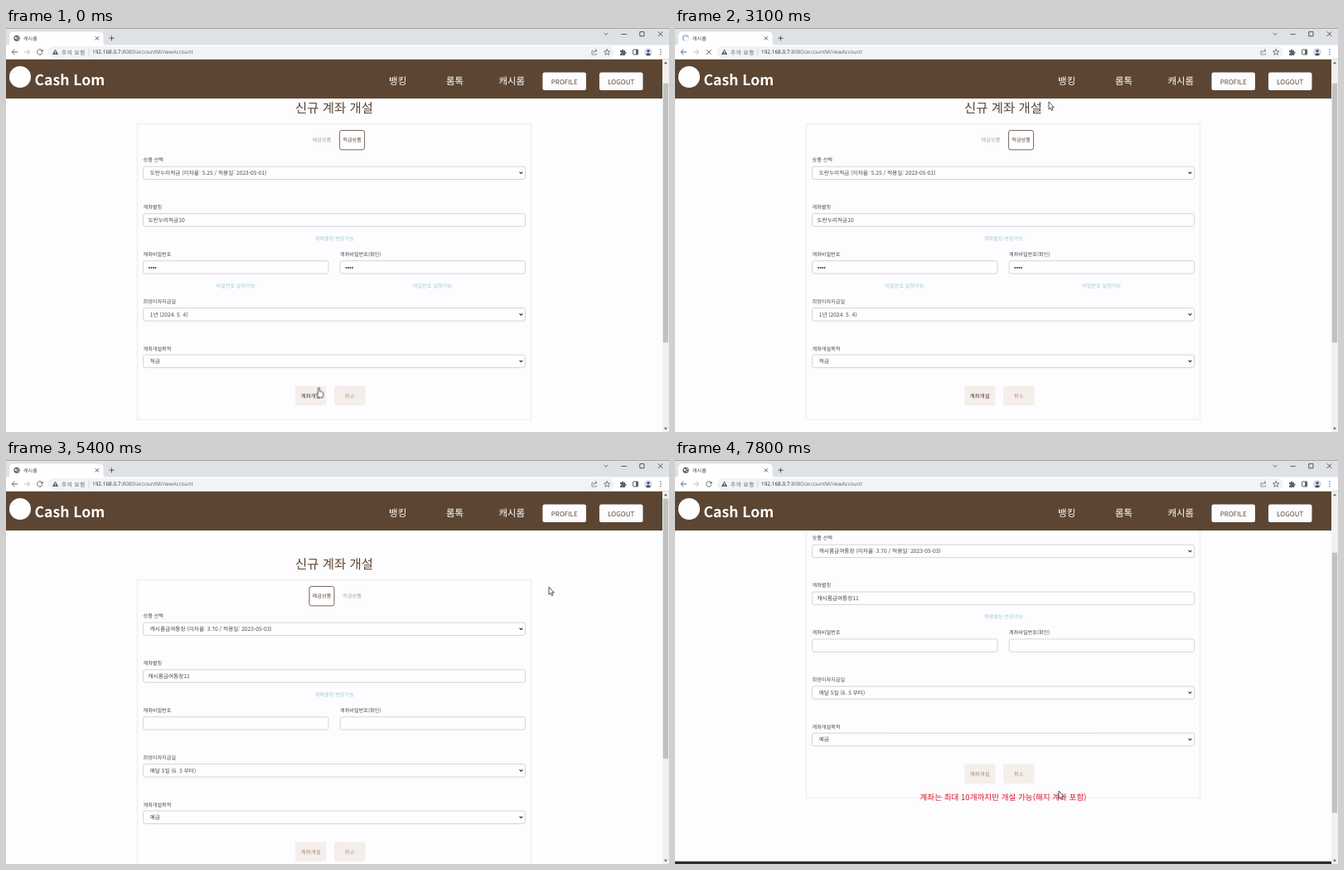
An HTML page that plays this animation: 800x487 px, repeating every 8 s.

```html
<!DOCTYPE html>
<html lang="ko">
<head>
<meta charset="utf-8">
<title>캐시롬</title>
<style>
html, body { margin: 0; width: 100%; height: 100%; overflow: hidden; background: #fdfcfe; }
svg { display: block; width: 100vw; height: 100vh; }
text { font-family: 'Noto Sans CJK KR', 'Noto Sans KR', 'Noto Sans CJK', sans-serif; text-rendering: geometricPrecision; white-space: pre; }
text.ui { font-family: 'Open Sans', 'Noto Sans CJK KR', 'Noto Sans CJK', sans-serif; }

/* page states, 1% = 80ms */
.first, .blank, .list, .last, .site, .idle, .busy, .ask, .done, .hover, .hand, .arrow { animation: 8s step-end infinite; }
.first { animation-name: first; }
.blank { animation-name: blank; }
.list { animation-name: list; }
.last { animation-name: last; }
.site { animation-name: site; }
.idle { animation-name: idle; }
.busy { animation-name: busy; }
.ask { animation-name: ask; }
.done { animation-name: done; }
.hover { animation-name: hover; }
.hand { animation-name: hand; }
.arrow { animation-name: arrow; }
@keyframes first { 0% { visibility: visible } 40%, 100% { visibility: hidden } }
@keyframes blank { 0% { visibility: hidden } 40% { visibility: visible } 52%, 100% { visibility: hidden } }
@keyframes list { 0% { visibility: hidden } 52% { visibility: visible } 65%, 100% { visibility: hidden } }
@keyframes last { 0% { visibility: hidden } 65%, 100% { visibility: visible } }
@keyframes site { 0% { visibility: visible } 40% { visibility: hidden } 52%, 100% { visibility: visible } }
@keyframes idle { 0% { visibility: visible } 37.5% { visibility: hidden } 52.5% { visibility: visible } 63.75% { visibility: hidden } 66.25%, 100% { visibility: visible } }
@keyframes busy { 0% { visibility: hidden } 37.5% { visibility: visible } 52.5% { visibility: hidden } 63.75% { visibility: visible } 66.25%, 100% { visibility: hidden } }
@keyframes ask { 0% { visibility: hidden } 2% { visibility: visible } 37.5%, 100% { visibility: hidden } }
@keyframes done { 0% { visibility: hidden } 41% { visibility: visible } 50.4%, 100% { visibility: hidden } }
@keyframes hover { 0% { visibility: hidden } 22.5% { visibility: visible } 34.5%, 100% { visibility: hidden } }
@keyframes hand { 0% { visibility: visible } 8% { visibility: hidden } 58% { visibility: visible } 65%, 100% { visibility: hidden } }
@keyframes arrow { 0% { visibility: hidden } 8% { visibility: visible } 58% { visibility: hidden } 65%, 100% { visibility: visible } }

#scroll { animation: scroll 8s ease-in-out infinite; }
#thumb { animation: thumb 8s ease-in-out infinite; }
@keyframes scroll {
  0%, 68.1% { transform: translateY(29px) }
  73.1%, 76.25% { transform: translateY(-59.7px) }
  78.75%, 100% { transform: translateY(-64.8px) }
}
@keyframes thumb {
  0%, 68.1% { transform: translateY(0) }
  73.1%, 76.25% { transform: translateY(60.5px) }
  78.75%, 100% { transform: translateY(65px) }
}
#spin { transform-origin: 13px 12.3px; animation: spin 1s linear infinite; }
@keyframes spin { to { transform: rotate(360deg) } }

#cursor { animation: move 8s ease-in-out infinite; }
@keyframes move {
  0%, 1.875% { transform: translate(377.5px, 433.5px) }
  6.25% { transform: translate(430.5px, 150.5px) }
  11.25% { transform: translate(446px, 96px) }
  15.6% { transform: translate(350px, 70px) }
  19.4% { transform: translate(478px, 70px) }
  23.75% { transform: translate(466px, 92px) }
  25% { transform: translate(465.5px, 91px) }
  33.75% { transform: translate(470px, 88px) }
  35%, 38% { transform: translate(450px, 89px) }
  43.75%, 50% { transform: translate(476.5px, 86.5px) }
  57.5% { transform: translate(689px, 154px) }
  58.75%, 65% { transform: translate(700px, 152px) }
  73.75%, 75% { transform: translate(437.5px, 158px) }
  85% { transform: translate(300px, 415px) }
  88.75% { transform: translate(480px, 415px) }
  91.25% { transform: translate(425px, 362px) }
  93.1% { transform: translate(265px, 405px) }
  96.25% { transform: translate(458px, 400px) }
  97.5%, 100% { transform: translate(463px, 399px) }
}
</style>
</head>
<body>
<svg id="stage" viewBox="0 0 800 487" preserveAspectRatio="none"></svg>
<script>
const BROWN = '#5c4633', TAN = '#a58d78', PALE = '#f5efec', DARK = '#3a3536', GREY = '#5f6368', BLUE = '#1a73e8';
const HOST = '192.168.0.7', DIR = ':8080/accountM/';

// y is the optical middle of the line
const text = (x, y, s, size, fill, weight = 400, anchor = 'middle', cls = '') =>
  `<text class="${cls}" x="${x}" y="${(y + size * .37).toFixed(2)}" font-size="${size}" fill="${fill}" font-weight="${weight}" text-anchor="${anchor}">${s}</text>`;
const left = (x, y, s, size, fill, weight, cls) => text(x, y, s, size, fill, weight, 'start', cls);
const rect = (x, y, w, h, fill, r = 0, stroke = 'none', sw = .8) =>
  `<rect x="${x}" y="${y}" width="${w}" height="${h}" rx="${r}" fill="${fill}" stroke="${stroke}" stroke-width="${sw}"/>`;
const line = (d, stroke, sw = 1) => `<path d="${d}" fill="none" stroke="${stroke}" stroke-width="${sw}"/>`;
const fill = (d, color) => `<path d="${d}" fill="${color}"/>`;
const circle = (x, y, r, color, stroke = 'none', sw = .8) =>
  `<circle cx="${x}" cy="${y}" r="${r}" fill="${color}" stroke="${stroke}" stroke-width="${sw}"/>`;
const group = (cls, ...parts) => `<g class="${cls}">${parts.join('')}</g>`;

function chrome() {
  const url = (cls, path) => group(cls,
    `<text class="ui" x="104" y="31.3" font-size="6.43" fill="#26282b">${HOST}<tspan fill="${GREY}">${DIR}${path}</tspan></text>`);
  return [
    rect(0, 0, 800, 21, '#dee1e6'), rect(0, 0, 800, 1, '#a2a5a9'),
    fill('M1 21Q4 21 4 18V9Q4 4.5 8.5 4.5H113Q117.5 4.5 117.5 9V18Q117.5 21 121 21Z', '#fff'),
    rect(0, 20.5, 800, 17, '#fff'), rect(0, 37, 800, 1, '#dddfe3'),
    group('idle', circle(13, 12.3, 3.6, GREY),
      fill('M10.3 11.2Q12 10.2 13 11.5T11.8 13.6ZM13.8 9.6L15.6 11 14.6 12.2ZM13.5 13.2L15.2 13.4 13.8 15Z', '#fff'),
      line('M43.4 27A3.2 3.2 0 1 0 44 29.8', GREY), fill('M44.6 25.4V28.6H41.4Z', GREY)),
    group('busy', '<g id="spin">' + circle(13, 12.3, 3.4, 'none', '#e4e6ea', 1) + line('M13 15.7A3.4 3.4 0 1 1 14.7 9.4', BLUE, 1) + '</g>',
      line('M38 26.3L43.6 31.9M43.6 26.3L38 31.9', GREY)),
    group('site', left(21, 12.3, '캐시롬', 6.1, '#4a4d51', 400, 'ui')),
    group('blank', left(21, 12.3, HOST + DIR + 'accou', 5.55, '#4a4d51', 400, 'ui'),
      rect(95, 6, 9, 13, 'url(#fade)'), rect(102, 6, 5, 13, '#fff')),
    line('M107.8 10.3L112 14.5M112 10.3L107.8 14.5', '#46494d', .9),
    line('M124.5 12.3H130.5M127.5 9.3V15.3', '#46494d', .9),
    line('M721.6 6L724 8.4 726.4 6', '#46494d', .8),
    line('M742.7 7.5H748.7M764.8 4.6H770V9.8H764.8ZM786.8 4.4L792.4 10M792.4 4.4L786.8 10', '#333', .8),
    line('M14 29H7.3M10.4 25.9L7.2 29 10.4 32.1', GREY),
    line('M22 29H28.7M25.6 25.9L28.8 29 25.6 32.1', '#babcbe'),
    rect(50.5, 22, 683.5, 14, '#f1f3f4', 7),
    fill('M59.5 25.4L63.2 32H55.8Z', GREY), line('M59.5 27.5V29.8M59.5 30.3V31.2', '#fff', .8),
    `<text class="ui" x="67" y="31.5" font-size="6.7" letter-spacing=".5" fill="${GREY}">주의 요함</text>`,
    rect(99.6, 24.5, .7, 9, '#c3c6c9'),
    url('first', 'newAccount'), url('blank', 'accounts_newAc'), url('list', 'accounts'), url('last', 'newAccount'),
    line('M708.5 27.3H707V32H712.6V30.5M708.8 30Q709 27.4 712.6 27.2M711 25.4L713 27.2 711 29', GREY, .7),
    line('M725.2 25.4L726.2 28 728.9 28.1 726.8 29.8 727.5 32.4 725.2 30.9 722.9 32.4 723.6 29.8 721.5 28.1 724.2 28Z', GREY, .8),
    fill('M741 27H743Q743 25.4 744.1 25.4T745.2 27H747.2V29Q748.7 29 748.7 30T747.2 31V33H741V31Q742.3 31 742.3 30T741 29Z', GREY),
    rect(756.6, 26, 6, 6, 'none', .5, GREY, 1), rect(760, 26, 2.8, 6, GREY),
    circle(775, 29, 4.8, '#d5dcea'), circle(775, 27.6, 1.6, '#3c4a66'), fill('M771.8 32Q775 28.4 778.2 32Q775 34.4 771.8 32Z', '#3c4a66'),
    circle(790, 26.2, .8, GREY), circle(790, 29, .8, GREY), circle(790, 31.8, .8, GREY)
  ].join('');
}

function header() {
  const button = (x, s) => rect(x, 53.5, 52.5, 21.5, '#fdfcfe', 2.5) + text(x + 26.2, 64.6, s, 8, BROWN);
  return group('site',
    rect(0, 38, 792, 47, BROWN), circle(17, 59, 13, '#fff'),
    left(34.5, 62.5, 'Cash Lom', 17.6, '#fff', 700),
    text(472.7, 63.5, '뱅킹', 11.5, '#fff', 500), text(541.5, 63.5, '롬톡', 11.5, '#fff', 500),
    text(610.3, 63.5, '캐시롬', 11.5, '#fff', 500),
    button(647.5, 'PROFILE'), button(716, 'LOGOUT'),
    rect(792, 38, 8, 449, '#f1f1f1'),
    fill('M796 40.6L798 43.2H794ZM796 484.4L798 481.8H794Z', '#606367'),
    group('first', rect(792.8, 66.7, 6.4, 312.5, '#c1c1c1')),
    group('list', rect(792.8, 47, 6.4, 289, '#c1c1c1')),
    group('last', '<g id="thumb">' + rect(792.8, 46.7, 6.4, 313.5, '#c1c1c1') + '</g>'));
}

function form(o) {
  const box = (x, y, w) => rect(x, y, w, 15.4, '#fefdff', 2.2, '#cac9cd');
  const select = (y, s) => box(165.6, y, 461) + left(173.7, y + 7.8, s, 6.67, '#4a4a4e') +
    line(`M619.6 ${y + 6.6}L621.5 ${y + 8.5} 623.4 ${y + 6.6}`, '#333', 1.1);
  const label = (x, y, s) => left(x, y, s, 6.15, '#4a4a4e', 500);
  const hint = (x, y, s) => text(x, y, s, 6.2, '#9fcbd3');
  const dots = x => [0, 1, 2, 3].map(i => circle(x + i * 2.5, 289, .95, '#333')).join('');
  const tab = (x, s, on) => (on ? rect(x - 15, 123.4, 30, 23.4, '#fefdff', 2.5, '#6b5240', .9) : '') +
    text(x, 135.2, s, 6.2, on ? '#5a4a3e' : '#a5a2a2');
  return [
    text(396, 96, '신규 계좌 개설', 15.5, BROWN, 500),
    rect(158.3, 115.4, 475.4, 356.6, 'none', 0, '#e8e6ea'),
    tab(381, '예금상품', !o.ready), tab(417.6, '적금상품', o.ready),
    label(165.5, 158.6, '상품 선택'), select(167, o.product),
    label(165.5, 215.7, '계좌별칭'), box(165.6, 223.8, 461), left(171.5, 231.6, o.nick, 6.67, '#4a4a4e'),
    hint(396.3, 253.6, '계좌별칭 변경가능'),
    label(165.5, 272.5, '계좌비밀번호'), label(403, 272.5, '계좌비밀번호(확인)'),
    box(165.6, 280.7, 223.4), box(403.2, 280.7, 223.4),
    o.ready ? dots(173) + dots(410.5) + hint(277, 310.4, '비밀번호 설정가능') + hint(514.6, 310.4, '비밀번호 설정가능') : '',
    label(165.5, 329.4, '희망이자지급일'), select(337.6, o.due),
    label(165.5, 386.3, '계좌개설목적'), select(394, o.goal),
    rect(349, 431.3, 37.6, 23.6, PALE, 2.5), rect(396, 431.3, 37.8, 23.6, PALE, 2.5),
    text(367.8, 443.2, '계좌개설', 6.5, o.ready ? '#4a3a33' : TAN, o.ready ? 500 : 400),
    text(414.8, 443.2, '취소', 6.5, '#b3947c'),
    o.ready ? '' : text(396, 471.6, '계좌는 최대 10개까지만 개설 가능(해지 계좌 포함)', 9.6, '#d9182f') + rect(0, 548.6, 792, 76, '#2b2a2e')
  ].join('');
}

function accounts() {
  const S = 7.65;
  const heads = (y, cols) => cols.map(([x, s]) => text(x, y, s, S, '#2c292b', 700)).join('');
  const badge = (x, y) => rect(x - 8.6, y - 4.6, 17.2, 9.8, PALE, 2) + text(x, y + .3, '수정', 5.8, TAN);
  const id = (x, y, no, sum) => text(x, y - 4, `888-01-0000${no}-0`, S, DARK) + text(x, y + 5.4, `잔액: ${sum}원`, 5.78, TAN);
  const link = (x, y, s) => text(x, y, s, S, TAN);
  const row = ([no, sum, nick, date, kind], i) => {
    const y = 214.2 + i * 33.25, main = kind === 'main', saving = kind === 'saving';
    return [
      text(38.5, y - 4, main ? '주' : '부', S, main ? '#ef7d55' : DARK), text(38.5, y + 5.4, saving ? '적금' : '예금', 5.8, '#8d8583'),
      id(120.4, y, no, sum), text(235.8, y, nick, S, DARK), badge(296.3, y),
      saving ? '' : circle(351.3, y + .3, 2.8, '#fff', main ? BLUE : '#85858a') + (main ? circle(351.3, y + .3, 1.7, BLUE) : ''),
      text(429.3, y, '사용중', S, DARK),
      main ? text(540.3, y, '주 계좌는 휴면 또는 해지 불가', 5.85, DARK)
        : (saving ? '' : link(503.5, y, '휴면신청')) + link(578, y, '해지신청'),
      link(652.3, y, '변경'), text(727, y, date, S, DARK),
      rect(20, y + 16.4, 744, .9, '#d6c3a6')
    ].join('');
  };
  const rows = [
    ['16', '410,000', '캐시롬_예금통장71', '2023-04-08'],
    ['24', '100,000,092,503', '캐시롬_예금통장6', '2023-04-26'],
    ['26', '100,000,538,898', '캐시롬_예금통장8', '2023-04-26', 'main'],
    ['27', '1,000', '캐시롬_예금통장1', '2023-04-26'],
    ['44', '1,000', '모두다참적금8', '2023-05-02', 'saving']
  ];
  return [
    left(23.3, 143.5, '윤서담 님의 계좌', 16.9, '#4f4743'),
    rect(684, 129.3, 60.6, 26.6, PALE, 3), text(714.5, 143, '새 계좌 개설', 8.2, '#ad9683', 500),
    heads(184.7, [[120.3, '계좌번호'], [247, '계좌별칭'], [351, '주 계좌설정'], [429.3, '계좌상태'], [503.4, '휴면전환'],
      [578, '해지신청'], [652.4, '비밀번호 변경'], [727, '계좌생성일']]),
    `<g clip-path="url(#table)">${rows.map(row).join('')}</g>`,
    rect(764.2, 172, 7.6, 177, '#f1f1f1'), rect(765, 179.3, 6, 88, '#c1c1c1'),
    fill('M768 174.2L769.8 176.6H766.2ZM768 346.8L769.8 344.4H766.2Z', '#606367'),
    heads(410, [[121.3, '계좌번호'], [249.3, '계좌별칭'], [354.4, '복구문의'], [433.4, '계좌상태'], [508.5, '계좌삭제'],
      [621.4, '해지일자'], [734.4, '계좌생성일']]),
    text(38.5, 439.4, '부', S, DARK), id(121.3, 439.5, '22', '100,291,780,000'),
    text(238.4, 439.5, '캐시롬_예금통장4', S, DARK), badge(299.5, 439.5),
    link(354.4, 439.5, '복구신청'), text(433.4, 439.5, '해지', S, DARK), link(508.5, 439.5, '계좌삭제'),
    text(621.6, 439.5, '2023-05-01', S, DARK), text(734.4, 439.5, '2023-04-26', S, DARK),
    rect(20, 455.6, 752, .9, '#d6c3a6')
  ].join('');
}

function dialog(cls, h, lines, buttons) {
  return group(cls,
    `<g filter="url(#shadow)">${rect(293.7, 36.3, 212.2, h, '#fff', 2.5)}</g>`,
    rect(293.7, 36.3, 212.2, h, '#fff', 2.5, '#cfd0d3', .6),
    left(301.5, 49, HOST + ':8080 내용:', 7, '#2c2e31', 400, 'ui'),
    lines.map((s, i) => left(301.8, 62.5 + i * 9.6, s, 6.72, '#3a3c40', 400, 'ui')).join(''),
    buttons);
}

const askButtons = rect(433.2, 84.2, 31.2, 15.6, '#fff', 2.2, '#1a56b8', 1) + rect(434.4, 85.4, 28.8, 13.2, BLUE, 1.2) +
  text(448.9, 91.9, '확인', 6.3, '#fff', 500) +
  rect(468.2, 84.6, 30, 14.8, '#fff', 2, '#dadce0') +
  group('hover', rect(468.2, 84.6, 30, 14.8, '#e9f1fd', 2, '#cfe0fa')) +
  text(483.3, 91.9, '취소', 6.3, BLUE);
const doneButton = rect(467.8, 75, 30.4, 15, BLUE, 2) + text(483, 82.4, '확인', 6.3, '#fff', 500);

document.getElementById('stage').innerHTML = [
  `<defs>
    <clipPath id="table"><rect x="0" y="172" width="764" height="177"/></clipPath>
    <linearGradient id="fade"><stop offset="0" stop-color="#fff" stop-opacity="0"/><stop offset=".9" stop-color="#fff"/></linearGradient>
    <filter id="shadow" x="-10%" y="-20%" width="120%" height="150%"><feDropShadow dx="0" dy="1.2" stdDeviation="1.4" flood-opacity=".4"/></filter>
  </defs>`,
  rect(0, 0, 800, 487, '#fdfcfe'),
  group('first', form({ ready: true, product: '도란누리적금 (이자율: 5.25 / 적용일: 2023-05-01)', nick: '도란누리적금10', due: '1년 (2024. 5. 4)', goal: '적금' })),
  group('list', accounts()),
  group('last', '<g id="scroll">' + form({ ready: false, product: '캐시롬급여통장 (이자율: 3.70 / 적용일: 2023-05-03)', nick: '캐시롬급여통장11', due: '매달 5일 (6. 5 부터)', goal: '예금' }) + '</g>'),
  header(), chrome(),
  dialog('ask', 71, ['계좌는 최대 10개까지 생성 가능합니다 ※ 해지계좌 포함 ( 현재: 9개 )', '신규 계좌를 개설하시겠습니까?'], askButtons),
  dialog('done', 61.5, ['새 계좌가 개설되었습니다'], doneButton),
  `<g id="cursor" fill="#fff" stroke="#26262a" stroke-width=".8" stroke-linejoin="round">
    <path class="arrow" d="M0 0V9.2L2.1 7.2 3.5 10.4 5 9.7 3.7 6.7H6.4Z"/>
    <path class="hand" d="M-1 1Q-1 0 0 0T1 1V4.6L4.4 5.3Q5.6 5.7 5.4 7L4.7 12H.2L-2.8 8Q-3 6.8-2 6.9L-1 7.8Z"/>
  </g>`
].join('');
</script>
</body>
</html>
```
